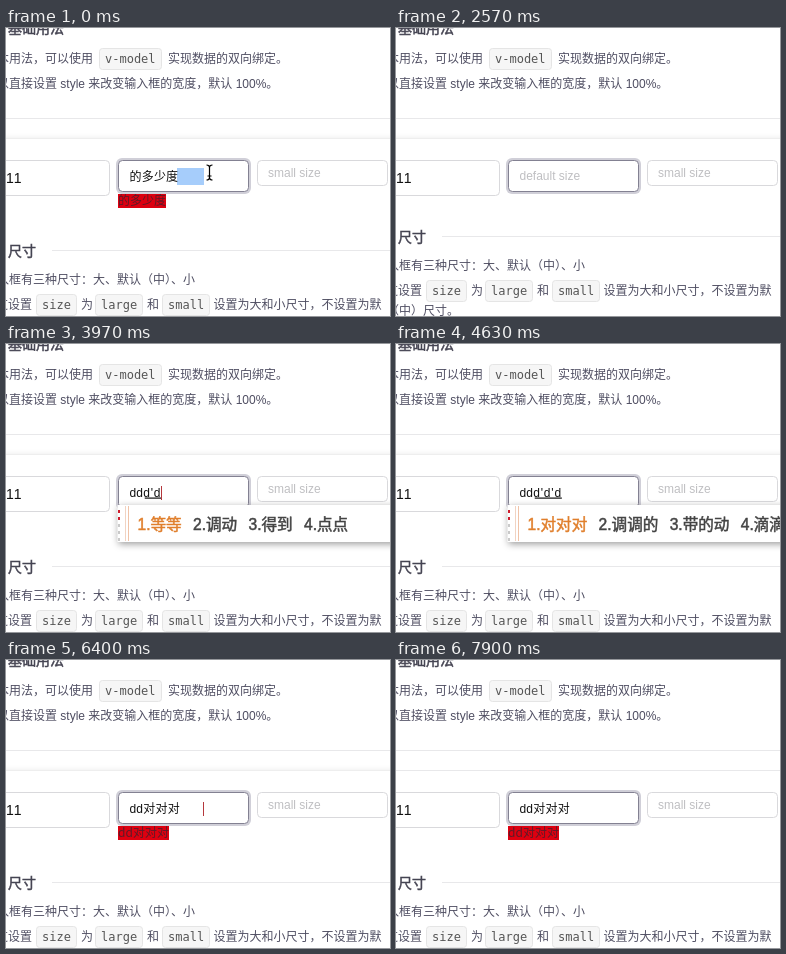
Animation of 384x288 px, one loop 8.23 s. Source, as an HTML page with a canvas:

```html
<!DOCTYPE html>
<html lang="zh-CN">
<head>
<meta charset="utf-8">
<style>
  html, body { margin: 0; width: 100%; height: 100%; overflow: hidden; background: #fff; }
  canvas { display: block; width: 384px; height: 288px; }
</style>
</head>
<body>
<canvas id="stage"></canvas>
<script>
const LOOP = 8230;
const SANS = "'Liberation Sans', 'Noto Sans CJK SC', 'Noto Sans CJK', sans-serif";
const CJK = "'Noto Sans CJK SC', 'Noto Sans CJK', sans-serif";
const MONO = "'DejaVu Sans Mono', monospace";
const BODY = '#4f4e62', HEADING = '#454452', INK = '#111', LINE = '#e8e8ea';
const BORDER = '#d9d9dc', HINT = '#bfbfc2';

const canvas = document.getElementById('stage');
const ctx = canvas.getContext('2d');
const dpr = window.devicePixelRatio || 1;
canvas.width = 384 * dpr;
canvas.height = 288 * dpr;
ctx.scale(dpr, dpr);
ctx.fontKerning = 'none'; // keeps full-width punctuation and digits at full advance

const clamp = v => Math.max(0, Math.min(1, v));
const progress = (t, from, to) => clamp((t - from) / (to - from));

// Value of the last [time, ...values] entry that has begun.
const current = (track, t) => track.filter(step => step[0] <= t).pop();

const edits = [
  [0, '的多少度'], [1530, ''], [2800, 'd'], [3000, 'dd'], [4970, 'dd对对对']
];
// Composition typed through the input method, with its candidates.
const compositions = [
  [0, ''],
  [3800, 'd', ['的', '多', '对', '到', '都']],
  [3960, "d'd", ['等等', '调动', '得到', '点点']],
  [4130, "d'd'd", ['对对对', '调调的', '带的动', '滴滴答']],
  [4970, '']
];
const spaceTimes = [5400, 5600, 5800, 5930, 6080, 6230, 6400];
// Each keystroke restarts the 500 ms caret blink.
const blinkStarts = [1070, 2800, 3000, 3800, 3960, 4130, 4970, ...spaceTimes];

// `bolder` thickens the strokes to a medium weight.
function text(str, x, y, { size = 12, color = BODY, family = SANS, spacing = 0, bolder = 0 } = {}) {
  ctx.font = `${size}px ${family}`;
  ctx.letterSpacing = `${spacing}px`;
  ctx.fillStyle = color;
  ctx.fillText(str, x, y);
  if (bolder) {
    ctx.lineWidth = bolder;
    ctx.strokeStyle = color;
    ctx.strokeText(str, x, y);
  }
  return ctx.measureText(str).width;
}

function rect(x, y, w, h, color) {
  ctx.fillStyle = color;
  ctx.fillRect(x, y, w, h);
}

function box(x, y, w, h, r, fill, stroke) {
  ctx.beginPath();
  ctx.roundRect(x + .5, y + .5, w - 1, h - 1, r);
  ctx.fillStyle = fill;
  ctx.fill();
  ctx.lineWidth = 1;
  ctx.strokeStyle = stroke;
  ctx.stroke();
}

function code(str, x, baseline) {
  box(x, baseline - 15, Math.round(str.length * 7.22 + 12), 22, 3, '#f6f6f6', '#e5e5e5');
  text(str, x + 6, baseline, { family: MONO, color: '#555' });
}

function withShadow(color, blur, offset, draw) {
  ctx.save();
  ctx.shadowColor = color;
  ctx.shadowBlur = blur * dpr;
  ctx.shadowOffsetY = offset * dpr;
  draw();
  ctx.restore();
}

function heading(str, baseline) {
  text(str, 2, baseline, { size: 14, color: HEADING, bolder: .5 });
}

function drawIntro() {
  heading('基础用法', 5);
  text('本用法，可以使用', -9, 35);
  code('v-model', 93, 35);
  text('实现数据的双向绑定。', 162, 35);
  text('以直接设置 style 来改变输入框的宽度，默认 100%。', -9, 60);
  rect(0, 90, 384, 1, LINE);
}

function drawCard(hover) {
  withShadow(`rgba(0,0,0,${.15 * hover})`, 7, 2, () => rect(-20, 110, 424, 400, '#fff'));
  rect(0, 110, 384, 1, hover > .5 ? '#eee' : LINE);
}

function drawDescription(shift) {
  ctx.save();
  ctx.translate(0, shift);
  heading('尺寸', 228);
  rect(46, 222, 338, 1, LINE);
  text('入框有三种尺寸：大、默认（中）、小', -9, 256);
  text('过设置', -10, 281);
  code('size', 30, 281);
  text('为', 75, 281);
  code('large', 89, 281);
  text('和', 141, 281);
  code('small', 156, 281);
  text('设置为大和小尺寸，不设置为默', 207.5, 281);
  text('（中）尺寸。', -9, 301);
  ctx.restore();
}

function drawInputs() {
  box(-30, 132, 134, 36, 4, '#fff', BORDER);
  text('11', 0, 155, { size: 14, color: INK });
  box(251, 132, 131, 26, 4, '#fff', BORDER);
  text('small size', 262, 149, { color: HINT });
  ctx.beginPath();
  ctx.roundRect(110, 130, 135, 36, 6);
  ctx.fillStyle = '#d0cfd8';
  ctx.fill();
  box(112, 132, 131, 32, 4, '#fff', '#838192');
}

function drawLabel(value) {
  if (!value) return;
  ctx.font = `12px ${CJK}`;
  ctx.letterSpacing = '0px';
  rect(112, 166, Math.round(ctx.measureText(value).width), 14, '#dc0010');
  text(value, 112, 177, { family: CJK, color: '#5d1a28' });
}

function drawField(t, value, composing) {
  const left = 123.5;
  if (t < 1000) rect(171, 140, 27, 17, '#a6cdfb');
  if (!value && !composing) text('default size', left, 152, { color: HINT });
  let end = left + text(value, left, 152.5, { color: INK, spacing: .2 });

  if (composing) {
    const width = text(composing, end, 152.5, { color: INK, spacing: .8 });
    rect(end + 1.5, 153.5, width - 1.5, 1.2, INK);
    end += width;
  }
  end += spaceTimes.filter(s => s <= t).length * 3.33;

  const start = blinkStarts.filter(s => s <= t).pop();
  if (start !== undefined && Math.floor((t - start) / 500) % 2 === 0) {
    rect(Math.floor(end), 142, 1, 14, t < 1530 ? '#dc8c5a' : '#b5373c');
  }
}

function drawCandidates(words, alpha) {
  ctx.save();
  ctx.globalAlpha = alpha;
  withShadow('rgba(0,0,0,.4)', 7, 2, () => rect(111.5, 161, 300, 37, '#fff'));
  for (let i = 0; i < 5; i++) rect(112, 166 + i * 7, 2, 3, i < 2 ? '#cf1e2e' : '#c9c9c9');
  rect(119, 162, 1, 35, '#f1d3c2');
  rect(122, 162, 1, 35, '#f0c3a8');
  let x = 131.5;
  words.forEach((word, i) => {
    const color = i ? '#444' : '#e07f2c';
    x += text(`${i + 1}.${word}`, x, 186, { size: 15.6, color, bolder: .5 }) + 11.3;
  });
  ctx.restore();
}

function drawIBeam(x, y) {
  ctx.beginPath();
  ctx.moveTo(x - 3, y - 7.5);
  ctx.quadraticCurveTo(x, y - 7.5, x, y - 5);
  ctx.lineTo(x, y + 5);
  ctx.quadraticCurveTo(x, y + 7.5, x - 3, y + 7.5);
  ctx.moveTo(x + 3, y - 7.5);
  ctx.quadraticCurveTo(x, y - 7.5, x, y - 5);
  ctx.moveTo(x, y + 5);
  ctx.quadraticCurveTo(x, y + 7.5, x + 3, y + 7.5);
  ctx.moveTo(x - 2, y + 3.5);
  ctx.lineTo(x + 2, y + 3.5);
  ctx.lineWidth = 1.2;
  ctx.strokeStyle = '#000';
  ctx.stroke();
}

function drawArrow(x, y) {
  const outline = [[0, 0], [0, 14], [3.3, 11], [5.6, 16], [7.8, 15], [5.6, 10.2], [10, 10]];
  ctx.beginPath();
  outline.forEach(([dx, dy]) => ctx.lineTo(x + dx, y + dy));
  ctx.closePath();
  ctx.lineWidth = 1.5;
  ctx.strokeStyle = '#fff';
  ctx.stroke();
  ctx.fillStyle = '#000';
  ctx.fill();
}

// The pointer hides while typing and later leaves towards the upper right.
function drawPointer(t) {
  if (t < 1000) return drawIBeam(203.5, 144.5);
  if (t < 7130 || t >= 7700) return;
  const p = progress(t, 7130, 7700);
  const x = 203.5 + 188 * p, y = 144.5 - 79 * p;
  (y > 132 ? drawIBeam : drawArrow)(x, y);
}

function draw(t) {
  const value = current(edits, t)[1];
  const [, composing, words] = current(compositions, t);

  rect(0, 0, 384, 288, '#fff');
  drawIntro();
  drawCard(1 - progress(t, 7380, 7580));
  drawInputs();
  drawLabel(value);
  drawField(t, value, composing);
  drawDescription(value ? 0 : -14);
  if (words) drawCandidates(words, progress(t, 3780, 3880));
  else if (t >= 4970 && t < 5130) drawCandidates(compositions[3][2], 1 - progress(t, 4970, 5130));
  drawPointer(t);
}

const origin = performance.now();
function tick() {
  draw((performance.now() - origin) % LOOP);
  requestAnimationFrame(tick);
}
tick();
</script>
</body>
</html>
```
